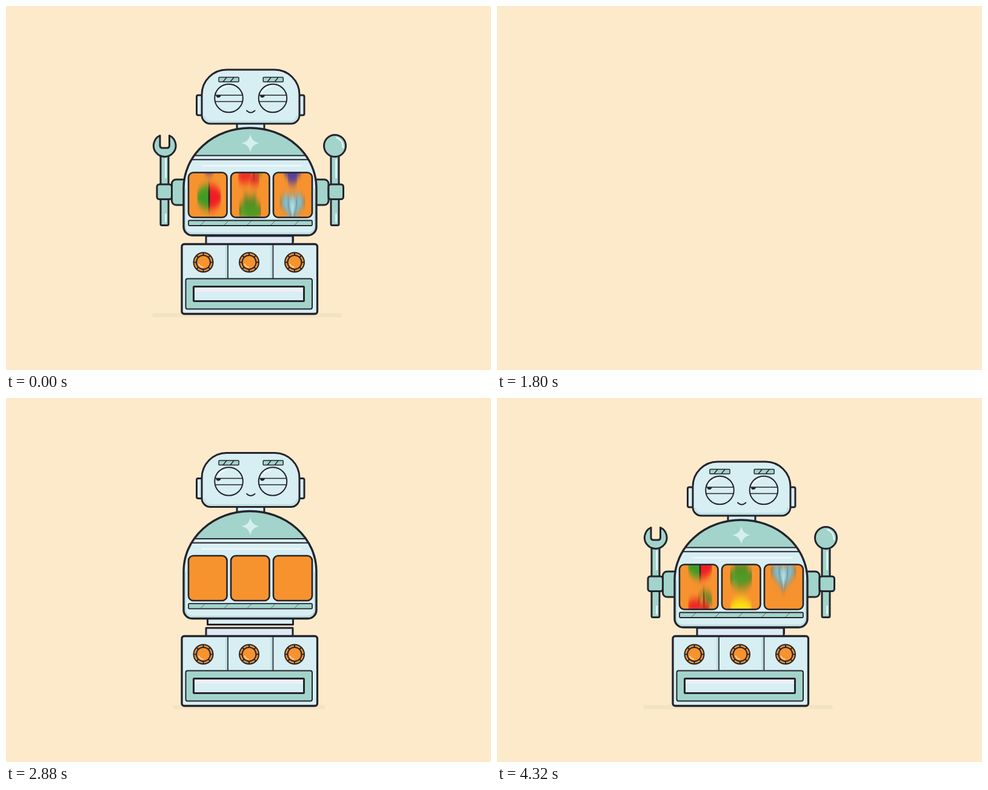
These frames come from a looping animation (800x600 px, 4.36 s). An HTML page:

```html
<!DOCTYPE html>
<html lang="en">
<head>
<meta charset="utf-8">
<title>Slot robot</title>
<style>
  html, body { margin: 0; width: 100%; height: 100%; overflow: hidden; background: #fdeacb; }
  svg { display: block; width: 100vw; height: 100vh; }
  .o { stroke: #25242c; stroke-width: 3; stroke-linejoin: round; }
  .thin { stroke-width: 2; }
  .hair { stroke-width: 1.5; }
  .l { fill: #d7eef3; }
  .t { fill: #a2d4cb; }
  .or { fill: #f7932e; }
  .n { fill: none; }
  .hi { fill: none; stroke: #f1fafc; stroke-width: 2.2; stroke-linecap: round; }
  .sh { fill: none; stroke: #b9dfe0; }
  .four { font: bold 62px "DejaVu Serif", "Noto Serif", serif; text-anchor: middle; stroke: #33261c; }
</style>
</head>
<body>
<svg viewBox="0 0 800 600">
  <defs>
    <clipPath id="torsoClip"><path d="M293 300A109.500 99 0 0 1 512 300V364a14 14 0 0 1-14 14H307a14 14 0 0 1-14-14Z"/></clipPath>

    <g id="four" class="four">
      <text x="-2" y="23" stroke-width="3" fill="#33261c">4</text>
      <text x="-4" y="22" stroke-width="1.200" fill="#fdefd3">4</text>
    </g>
    <g id="lime">
      <circle cy="4" r="17.500" fill="#4f9a25" stroke="#245c1c" stroke-width="1.200"/>
      <path d="M0-13Q-3-20-11-20Q-9-13 0-13Q3-20 11-20Q9-13 0-13" fill="#3f8f2a" stroke="#245c1c"/>
      <path d="M0-12V-18M-4-11L0-13L4-11" fill="none" stroke="#245c1c" stroke-width="1.500"/>
      <path d="M-13 8Q-11 14-5 16" fill="none" stroke="#a9d37a" stroke-width="1.500" stroke-linecap="round"/>
    </g>
    <g id="lemon">
      <ellipse rx="18" ry="19" fill="#fbe413"/>
      <path d="M-4-18L0-22L4-18M-4 18L0 22L4 18" fill="#e3c70e"/>
    </g>
    <g id="melon">
      <path d="M0-20A20 20 0 0 0 0 20Z" fill="#3f9b25"/>
      <path d="M0-20A20 20 0 0 1 0 20Z" fill="#ee1c25"/>
      <path d="M0-20V20" stroke="#2a2a1e" stroke-width="2.500"/>
    </g>
    <g id="cherry">
      <path d="M-8 4Q-2-8 6-18Q6-6 7 6" fill="none" stroke="#46521c" stroke-width="2.500"/>
      <path d="M6-18Q22-18 20 2Q8 0 6-18" fill="#5d8426"/>
      <circle cx="-9" cy="6" r="11" fill="#ee1c25"/>
      <circle cx="7" cy="10" r="9" fill="#d81c25"/>
    </g>
    <g id="grape" fill="#54409a">
      <circle cx="-12" cy="-10" r="8"/><circle cy="-12" r="8"/><circle cx="12" cy="-10" r="8"/>
      <circle cx="-6" cy="1" r="8"/><circle cx="6" cy="1" r="8"/><circle cy="13" r="8"/>
    </g>
    <g id="gem" stroke="#3b5a66" stroke-width="1.200" stroke-linejoin="round">
      <path d="M-21-9L-13-20H13L21-9L0 22Z" fill="#86c9d8"/>
      <path d="M-21-9H21M-8-9L0 22L8-9L0-20Z" fill="#b5dfe6"/>
    </g>

    <g id="knob" class="o thin">
      <circle class="or" r="16"/>
      <path d="M-16 0H16M0-16V16M-11.300-11.300L11.300 11.300M-11.300 11.300L11.300-11.300"/>
      <circle class="or" r="11.500"/>
      <path class="n" d="M-7.500 3Q-5.500 7-1 8" style="stroke:#fde3bd;stroke-width:1.600" stroke-linecap="round"/>
    </g>
    <g id="eye" class="o thin">
      <circle class="l" r="23.300"/>
      <path class="hi" d="M-18-9Q-13-18-3-19.500"/>
      <path class="n" d="M-22.700-5H22.700M-22.700 5.500H22.700" style="stroke-width:1.600"/>
      <path d="M-21-5H-13Q-13.500-1-17.500-1Q-21-1-21-5" fill="#25242c" stroke="none"/>
    </g>
    <g id="brow" class="o hair">
      <rect class="t" width="33" height="7.500" rx="1"/>
      <path d="M7 7.500L13 0M19 7.500L25 0"/>
    </g>
  </defs>

  <g id="robot">
    <rect id="shadow" y="506" height="7" rx="3.500" fill="#f2e3c3"/>
    <g class="rider"><rect class="o l" x="332.500" y="366" width="141" height="22"/></g>

    <g id="base" class="o">
      <rect x="330" y="379" width="143" height="16" fill="#deebf7"/>
      <rect class="l" x="290" y="392.500" width="223.500" height="115" rx="4" style="stroke-width:3.300"/>
      <path class="sh" d="M363.500 395V448M438 395V448" stroke-width="3"/>
      <path d="M366 393V449M440.500 393V449" style="stroke-width:1.700"/>
      <use href="#knob" x="325.500" y="422.500"/>
      <use href="#knob" x="401" y="422.500"/>
      <use href="#knob" x="476" y="422.500"/>
      <rect class="t thin" x="296.500" y="449.500" width="208.500" height="50" rx="3"/>
      <rect class="l" x="309.500" y="462.500" width="182" height="24" rx="1"/>
      <path d="M311 467.500H490" style="stroke:#ebf0fa;stroke-width:7"/>
    </g>

    <g class="rider">
      <g id="armL" class="o">
        <path class="t" d="M300 286H280.500a7 7 0 0 0-7 7V321a7 7 0 0 0 7 7H300Z"/>
        <rect class="t" x="255" y="243" width="13" height="118.500" rx="2"/>
        <path class="hi" d="M263.500 252V283M263.500 343V356"/>
        <path class="t" d="M254 213.500A18.300 18.300 0 1 0 269.500 213.500V230q0 4-4 4H258q-4 0-4-4Z"/>
        <rect class="t" x="249" y="294" width="24.500" height="24.500" rx="4"/>
      </g>
      <g id="armR" class="o">
        <path class="t" d="M505 286H525a7 7 0 0 1 7 7V321a7 7 0 0 1-7 7H505Z"/>
        <rect class="t" x="536" y="306" width="13" height="55.500" rx="2"/>
        <path class="hi" d="M544.500 343V356"/>
        <g id="rod">
          <rect class="t" x="536" y="-70" width="13" height="70" vector-effect="non-scaling-stroke"/>
          <path class="hi" d="M544.500-53V-23"/>
        </g>
        <rect class="t" x="532" y="294" width="24.500" height="24.500" rx="4"/>
        <g id="ball">
          <circle class="t" r="18"/>
          <path class="hi" d="M3-13.500Q13-10 13.500 3"/>
        </g>
      </g>

      <rect class="o l" x="381" y="190" width="45" height="16"/>
      <rect class="o l" x="314.500" y="147" width="12" height="33" rx="2.500"/>
      <rect class="o l" x="480" y="147" width="12" height="33" rx="2.500"/>
      <path class="o l" d="M364 105H443A41 41 0 0 1 484 146V180A14 14 0 0 1 470 194H337A14 14 0 0 1 323 180V146A41 41 0 0 1 364 105Z"/>
      <path class="sh" d="M327 181Q328 190.500 338 190.500H469Q479 190.500 480 181" stroke-width="2"/>
      <use href="#brow" x="351" y="117.500"/>
      <use href="#brow" x="424.200" y="117.500"/>
      <use href="#eye" x="367.500" y="152"/>
      <use href="#eye" x="440" y="152"/>
      <path class="o n" d="M397 172.500Q403.500 179 410.500 172.500" style="stroke-width:1.900" stroke-linecap="round"/>

      <g clip-path="url(#torsoClip)">
        <rect class="l" x="290" y="198" width="226" height="184"/>
        <rect class="t" x="290" y="198" width="226" height="48.500"/>
        <path class="sh" d="M296 300V364Q297 374.500 308 374.500H497Q508 374.500 509 364V300" stroke-width="2"/>
        <path class="o thin" d="M290 246.500H516M290 253.200H516"/>
      </g>
      <path d="M403 211Q405 224 418 226Q405 228 403 241.500Q401 228 388 226Q401 224 403 211" fill="#d5eff1"/>
      <path class="hi" d="M323 263.500H486"/>
      <path class="o n" d="M293 300A109.500 99 0 0 1 512 300V364a14 14 0 0 1-14 14H307a14 14 0 0 1-14-14Z" style="stroke-width:3.400"/>
      <rect class="o t" x="301" y="353.500" width="204" height="8.500" rx="1.500" style="stroke-width:1.800"/>
      <path class="o" d="M321 361L328 354M360 361L367 354M398 361L405 354M437 361L444 354M476 361L483 354" style="stroke-width:1;opacity:.6"/>
      <g id="panels"></g>
    </g>
  </g>
</svg>
<script>
const NS = "http://www.w3.org/2000/svg";
const LOOP = 4360, STEP = 40, PITCH = 60, MID = 311, IDLE = -1.4;
const SPIN = 3560, MARK = 800;
const $ = id => document.getElementById(id);

function add(parent, tag, attrs) {
  const el = document.createElementNS(NS, tag);
  for (const k in attrs) el.setAttribute(k, attrs[k]);
  parent.appendChild(el);
  return el;
}

const symbols = { 4: "four", l: "lime", y: "lemon", a: "melon", c: "cherry", g: "grape", d: "gem" };

// at: strip position when MARK ms of spinning have passed; speed in symbols per ms
const reels = [
  { x: 301, w: 63.5, cx: 335, strip: "lydgcalycagdly4", at: 9.07, speed: .0158, stop: 1260 },
  { x: 371, w: 63.5, cx: 402.5, strip: "gdcaylgdaylcagdyal", at: 10.38, speed: .018, stop: 1340 },
  { x: 441, w: 64, cx: 472.5, strip: "ycalgdly dgcylagdc4", at: 9.35, speed: .0158, stop: 1520 }
];

const defs = document.querySelector("defs");
reels.forEach((r, i) => {
  const box = { x: r.x, y: 274.5, width: r.w, height: 74, rx: 8 };
  add(add(defs, "clipPath", { id: "clip" + i }), "rect", box);
  const filter = add(defs, "filter", {
    id: "blur" + i, filterUnits: "userSpaceOnUse", x: r.x - 10, y: 180, width: 90, height: 260,
    "color-interpolation-filters": "sRGB"
  });
  r.blur = add(filter, "feGaussianBlur", { stdDeviation: "0 1" });
  r.filter = `url(#blur${i})`;
  add($("panels"), "rect", { ...box, class: "or" });
  r.layer = add(add($("panels"), "g", { "clip-path": `url(#clip${i})` }), "g", {});
  r.items = [...r.strip].map(c => symbols[c] && add(r.layer, "use", { href: "#" + symbols[c] }));
  add($("panels"), "rect", { ...box, class: "o n", style: "stroke-width:2.6" });

  r.end = r.strip.length - 1;
  r.rise = 2 * (MARK - (r.at - IDLE) / r.speed);
  r.fall = 2 * (r.stop - MARK - (r.end - r.at) / r.speed);
});

const clamp = x => Math.max(0, Math.min(1, x));
const smooth = x => (x = clamp(x), x * x * (3 - 2 * x));
const mix = (a, b, k) => a + (b - a) * k;

function backOut(p, c = 1.3) {
  const x = clamp(p) - 1;
  return 1 + (c + 1) * x ** 3 + c * x * x;
}

// Strip position: speed up, run evenly, slow down
function reelPos(r, u) {
  if (u <= 0) return IDLE;
  if (u >= r.stop) return r.end;
  if (u < r.rise) return IDLE + r.speed * u * u / (2 * r.rise);
  const left = r.stop - u;
  if (left < r.fall) return r.end - r.speed * left * left / (2 * r.fall);
  return r.at + r.speed * (u - MARK);
}

function reelSpeed(r, u) {
  return r.speed * Math.min(clamp(u / r.rise), clamp((r.stop - u) / r.fall));
}

function drawReel(r, u) {
  const pos = reelPos(r, u), blur = reelSpeed(r, u) * PITCH * 7.5;
  r.items.forEach((el, i) => {
    if (!el) return;
    const off = pos - i;
    el.style.display = Math.abs(off) < 1.7 ? "" : "none";
    el.setAttribute("transform", `translate(${r.cx} ${MID + off * PITCH})`);
  });
  if (blur > .2) {
    r.blur.setAttribute("stdDeviation", `0 ${blur.toFixed(2)}`);
    r.layer.setAttribute("filter", r.filter);
  } else r.layer.removeAttribute("filter");
}

function drop(t, start, time) {
  return -520 * (1 - clamp((t - start) / time) ** 2);
}

function drawLever(t) {
  const pull = t < 3800 ? smooth((t - 3540) / 260) : 1 - smooth((t - 3820) / 280);
  const k = t < 1800 ? 0 : pull;
  const s = mix(1, -.42, k);
  $("rod").setAttribute("transform", `translate(0 306) scale(1 ${s})`);
  $("ball").setAttribute("transform", `translate(542.5 ${306 - 75.5 * s}) scale(${1 + .36 * k})`);
}

function draw(t) {
  const whole = t < 1800;
  $("robot").style.display = whole || t >= 2280 ? "" : "none";

  $("base").setAttribute("transform", `translate(0 ${whole ? 0 : drop(t, 2240, 230)})`);

  let y = 0;
  if (!whole) {
    const after = t - 2884;
    y = after < 0 ? drop(t, 2600, 284) : 10 * Math.sin(Math.PI * after / 70) * Math.exp(-after / 90);
    if (t >= 3360) y = 0;
  }
  document.querySelectorAll(".rider").forEach(g => g.setAttribute("transform", `translate(0 ${y})`));

  const p = whole ? 1 : (t - 2960) / 400, slide = 110 * (1 - backOut(p));
  [["armL", slide], ["armR", -slide]].forEach(([id, x]) => {
    $(id).style.display = p > 0 ? "" : "none";
    $(id).setAttribute("transform", `translate(${x} 0)`);
  });

  const grow = whole ? 1 : smooth((t - 2640) / 700);
  const half = mix(114, 156.5, grow);
  $("shadow").setAttribute("x", mix(402, 397.5, grow) - half);
  $("shadow").setAttribute("width", half * 2);
  $("shadow").style.opacity = whole ? 1 : clamp((t - 2440) / 480);

  drawLever(t);
  const u = whole ? t + LOOP - SPIN : t - SPIN;
  reels.forEach(r => drawReel(r, u));
}

const born = performance.now();
let last = -1;
function tick() {
  const t = Math.floor(((performance.now() - born) % LOOP) / STEP) * STEP;
  if (t !== last) draw(last = t);
  requestAnimationFrame(tick);
}
tick();
</script>
</body>
</html>
```
